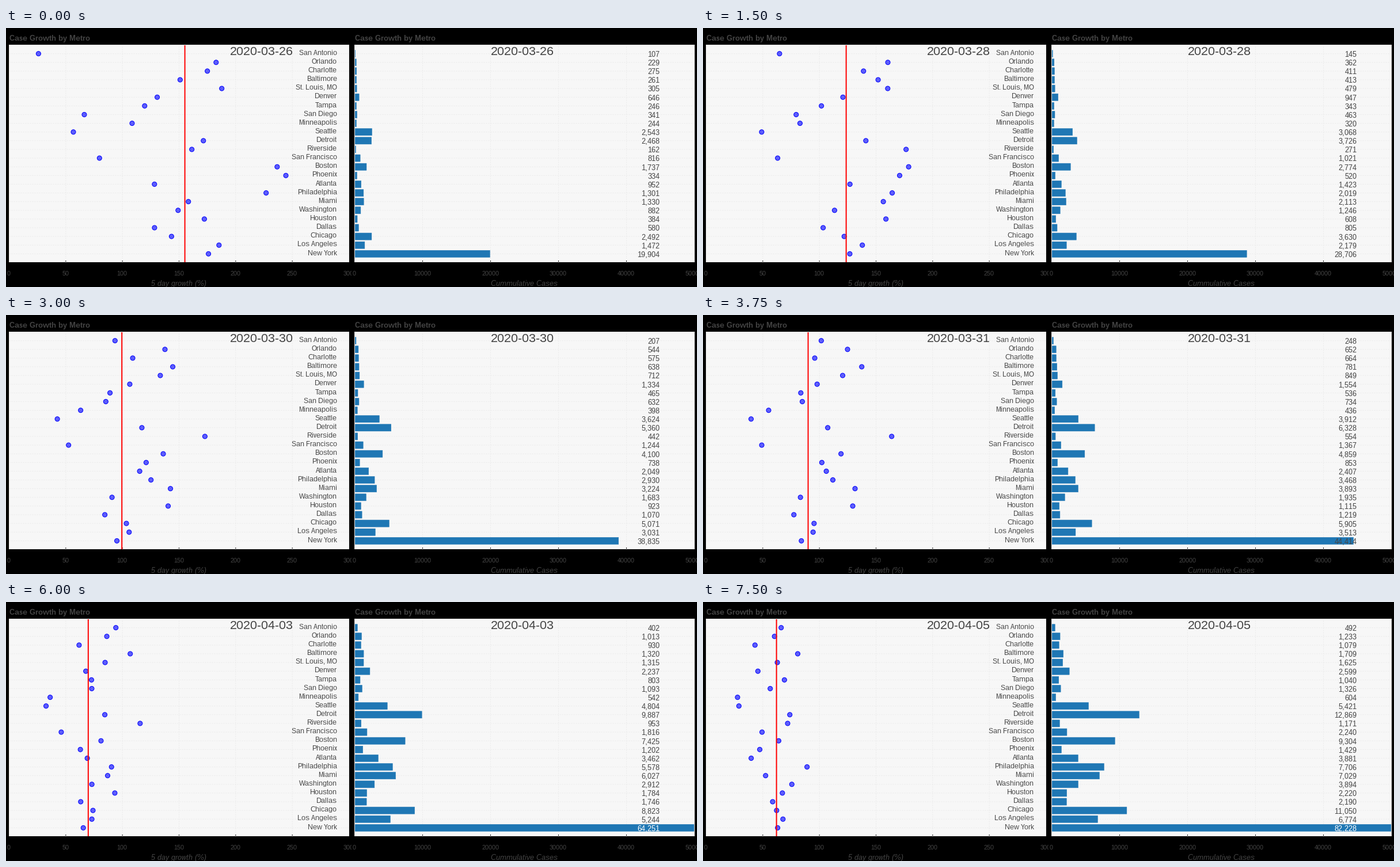
Animation of 1200 by 450 pixels, one loop 8000 ms. Source, as a matplotlib script:

```python
import matplotlib.pyplot as plt
import numpy as np
from matplotlib.animation import FuncAnimation
from matplotlib.patches import Ellipse
from matplotlib.transforms import Bbox

W, H = 1200, 450
TOP, BOTTOM, PANEL_W = 29.5, 406.5, 590
ROW = 15.12        # pixels between two metros
GREY, PAPER, GRID = "#444444", "#f7f7f7", "#ebebeb"
LAG = 4            # days between the counts that growth compares
LAST_DAY = 10
LABEL_X = 45000    # right edge of the case labels

plt.rcParams.update({
    "font.family": "Liberation Sans",
    "text.hinting": "native",
    "text.hinting_factor": 1,
    "path.snap": False,
})

# Case totals on four key days; a smooth growth curve joins them.
KEY_DAYS = (-4, 0, 5, 10)
METROS = {
    "San Antonio": (85, 107, 248, 492),
    "Orlando": (81, 229, 652, 1233),
    "Charlotte": (100, 275, 664, 1079),
    "Baltimore": (104, 261, 781, 1709),
    "St. Louis, MO": (106, 305, 849, 1625),
    "Denver": (280, 646, 1554, 2599),
    "Tampa": (112, 246, 536, 1040),
    "San Diego": (205, 341, 734, 1326),
    "Minneapolis": (117, 244, 436, 604),
    "Seattle": (1623, 2543, 3912, 5421),
    "Detroit": (909, 2468, 6328, 12869),
    "Riverside": (62, 162, 554, 1171),
    "San Francisco": (454, 816, 1367, 2240),
    "Boston": (516, 1737, 4859, 9304),
    "Phoenix": (97, 334, 853, 1429),
    "Atlanta": (417, 952, 2407, 3881),
    "Philadelphia": (398, 1301, 3468, 7706),
    "Miami": (515, 1330, 3893, 7029),
    "Washington": (354, 882, 1935, 3894),
    "Houston": (141, 384, 1115, 2220),
    "Dallas": (254, 580, 1219, 2190),
    "Chicago": (1024, 2492, 5905, 11050),
    "Los Angeles": (516, 1472, 3513, 6774),
    "New York": (7212, 19904, 44414, 82228),
}
rows = np.arange(len(METROS), 0, -1)
curves = np.polyfit(KEY_DAYS, np.log(list(METROS.values())).T, 3)


def cases_on(day):
    """Total cases of every metro: the exponential of a cubic in time."""
    return np.exp(day ** np.arange(3, -1, -1.0) @ curves).round()


fig = plt.figure(figsize=(12, 4.5), dpi=100, facecolor="black")


def pt(px):
    return px * 72 / fig.dpi


def write(x, y, text, px, **style):
    """Put text on the stage at a pixel position, y being the baseline."""
    return fig.text(x / W, 1 - y / H, text, fontsize=pt(px), color=GREY,
                    va="baseline", **style)


def panel(left, x_max, step, x_label):
    """Draw one chart frame with its grid, ticks, title and axis text."""
    ax = fig.add_axes((left / W, 1 - BOTTOM / H, PANEL_W / W, (BOTTOM - TOP) / H))
    floor = 25 - (BOTTOM - TOP) / ROW
    ax.set(xlim=(0, x_max), ylim=(floor, 25), xticks=[], yticks=[], facecolor=PAPER)
    for spine in ax.spines.values():
        spine.set(color="#e5e5e5", linewidth=pt(1))
    dashed = dict(color=GRID, lw=pt(1), dashes=(2, 2), zorder=0.5)
    for y in rows:
        ax.axhline(y, **dashed)
    half = Bbox.from_extents(left - 5.5, 0, left + 594.5, H)
    for value in range(0, x_max + 1, step):
        x = left + PANEL_W * value / x_max
        label = write(x - 0.5, 430, str(value), 10.67, ha="center")
        label.set(clip_box=half, clip_on=True)
        if 0 < value < x_max:
            ax.axvline(value, **dashed)
            ax.plot([value, value], [floor, floor + 2 / ROW], color="black",
                    lw=pt(1), zorder=1)
    write(left, 22, "Case Growth by Metro", 13.33, weight="bold")
    write(left + PANEL_W / 2 - 0.5, 448, x_label, 13, style="italic", ha="center")
    return ax


def row_text(ax, x, y, drop, text, px):
    """Right-aligned text beside a row, its baseline `drop` pixels lower."""
    nudge = ax.get_xlim()[1] / PANEL_W
    return ax.text(x - nudge, y - drop / ROW, text, fontsize=pt(px), color=GREY,
                   ha="right", va="baseline", zorder=4)


growth_ax = panel(5.5, 300, 50, "5 day growth (%)")
cases_ax = panel(605.5, 50000, 10000, "Cummulative Cases")

DOT = 8
dots = [growth_ax.add_patch(Ellipse((0, y), DOT * 300 / PANEL_W, DOT / ROW,
                                    fc=(0, 0, 1, 0.62), ec="blue", lw=pt(1), zorder=2))
        for y in rows]
for name, y in zip(METROS, rows):
    row_text(growth_ax, 290, y, 2.2, name, 12)
mean_line = growth_ax.axvline(0, color="red", lw=pt(2), zorder=3)

bars = cases_ax.barh(rows, np.zeros(len(rows)), height=0.8, color="#1f77b4",
                     edgecolor="#1f77b4", lw=pt(0.5), zorder=2)
labels = [row_text(cases_ax, LABEL_X, y, 5.4, "", 13.33) for y in rows]

dates = [ax.text(x, 25 - (47 - TOP) / ROW, "", fontsize=pt(21.33), color=GREY,
                 va="baseline", zorder=4)
         for ax, x in ((growth_ax, 195), (cases_ax, 20000))]


def update(frame):
    day = min(frame // 3, LAST_DAY)
    now, before = cases_on(day), cases_on(day - LAG)
    growth = 100 * (now / before - 1)
    for dot, x, y in zip(dots, growth, rows):
        dot.set_center((x, y))
    overall = 100 * (now.sum() / before.sum() - 1)
    mean_line.set_xdata([overall, overall])
    for bar, label, total in zip(bars, labels, now):
        bar.set_width(total)
        label.set_text(f"{total:,.0f}")
        label.set_color("white" if total > LABEL_X else GREY)
    for date in dates:
        date.set_text(str(np.datetime64("2020-03-26") + day))
    return []


anim = FuncAnimation(fig, update, frames=32, interval=250, repeat=True,
                     repeat_delay=0, init_func=lambda: update(0))
plt.show()
```
